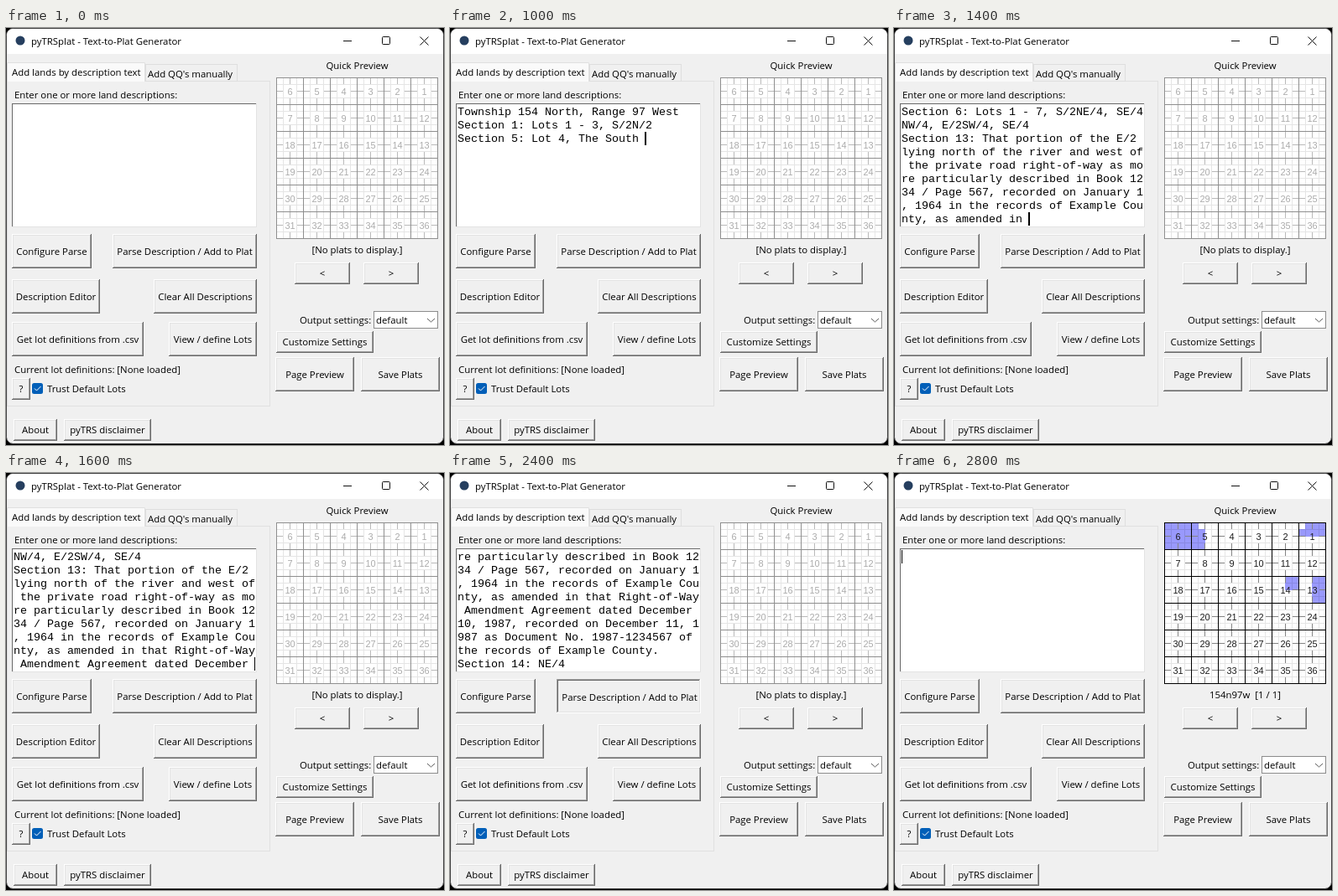
An HTML page for the animation above (4.6 s loop, 522 px wide and 498 px high).

```html
<!DOCTYPE html>
<html lang="en">
<head>
<meta charset="utf-8">
<title>Text-to-Plat Generator</title>
<style>
  html, body { margin: 0; width: 100%; height: 100%; overflow: hidden; background: #000; }
  svg { display: block; }
  text { font: 11.38px "Open Sans", "Noto Sans", sans-serif; white-space: pre; fill: #000; }
  .mid { text-anchor: middle; }
  .typed text { font: 13.333px "Liberation Mono", monospace; }
  .plat { --line: #8f8f8f; --half: #b9b9b9; --label: #ababab; }
  .plat.filled { --line: #000; --half: #848484; --label: #1c1c1c; }
  .plat path { fill: none; shape-rendering: crispEdges; }
  .plat .quarter { stroke: #000; stroke-opacity: .1; }
  .plat .half { stroke: var(--half); }
  .plat .section { stroke: var(--line); }
  .plat text { font: 11px "Liberation Sans", sans-serif; fill: var(--label); }
  .tracts { visibility: hidden; shape-rendering: crispEdges; }
  .filled .tracts { visibility: visible; }
</style>
</head>
<body>
<svg id="stage" width="522" height="498" viewBox="0 0 522 498"></svg>
<script>
const LOOP = 4600;
const COLUMNS = 36, ROWS = 9, CHAR = 8, LINE = 16;
const DESCRIPTION = `Township 154 North, Range 97 West
Section 1: Lots 1 - 3, S/2N/2
Section 5: Lot 4, The South Half of the Northwest Quarter, SW/4
Section 6: Lots 1 - 7, S/2NE/4, SE/4NW/4, E/2SW/4, SE/4
Section 13: That portion of the E/2 lying north of the river and west of the private road right-of-way as more particularly described in Book 1234 / Page 567, recorded on January 1, 1964 in the records of Example County, as amended in that Right-of-Way Amendment Agreement dated December 10, 1987, recorded on December 11, 1987 as Document No. 1987-1234567 of the records of Example County.
Section 14: NE/4`;

const upTo = phrase => DESCRIPTION.slice(0, DESCRIPTION.indexOf(phrase) + phrase.length);
const STEPS = [
  { at: 0, text: "" },
  { at: 1000, text: upTo("The South "), caret: true },
  { at: 1200, text: upTo("lying north of the river "), caret: true },
  { at: 1400, text: upTo("amended in "), caret: true },
  { at: 1600, text: upTo("dated December "), caret: true },
  { at: 1800, text: DESCRIPTION, caret: true },
  { at: 2400, text: DESCRIPTION, pressed: true },
  { at: 2800, text: "", caret: true, filled: true }
];

const rect = (x, y, w, h, fill, extra = "") =>
  `<rect x="${x}" y="${y}" width="${w}" height="${h}" fill="${fill}" ${extra}/>`;
const path = (d, attrs) => `<path d="${d}" ${attrs}/>`;
const label = (x, y, text, attrs = "") => `<text x="${x}" y="${y + 4}" ${attrs}>${text}</text>`;
const centered = (x, y, text, attrs = "") => label(x, y, text, `class="mid" ${attrs}`);

// One-pixel 3D edge around a face.
const edge = (x, y, w, h, topLeft, bottomRight, face) =>
  rect(x, y, w, h, bottomRight) + rect(x, y, w - 1, h - 1, topLeft)
  + rect(x + 1, y + 1, w - 2, h - 2, face);

function button(x, y, w, h, text, pressed = false) {
  const face = "#f0f0f0", shift = pressed ? 1 : 0;
  const outer = pressed ? ["#a0a0a0", "#fff"] : ["#fff", "#696969"];
  const inner = pressed ? ["#696969", "#e3e3e3"] : ["#e3e3e3", "#a0a0a0"];
  return edge(x, y, w, h, ...outer, face)
    + edge(x + 1, y + 1, w - 2, h - 2, ...inner, face)
    + centered(x + w / 2 + shift, Math.round(y + h / 2) + shift, text);
}

function titleBar() {
  return path("M1 31V9a8 8 0 0 1 8-8H513a8 8 0 0 1 8 8V31z", 'fill="#fff"')
    + '<circle cx="17" cy="15" r="5.5" fill="#263f5f"/>'
    + label(30, 16, "pyTRSplat - Text-to-Plat Generator")
    + rect(448.5, 10.5, 9, 9, "none", 'rx="1" stroke="#111"')
    + path("M402 15.5h10M493.5 10.5l10 10M503.5 10.5l-10 10", 'fill="none" stroke="#111"');
}

function notebook() {
  const parse = [127, 246, 172, 41, "Parse Description / Add to Plat"];
  return rect(1.5, 63.5, 313, 388, "#f0f0f0", 'stroke="#e0e0e0"')
    + rect(166.5, 43.5, 109, 20, "#f0f0f0", 'stroke="#dedede"')
    + path("M1.5 64V41.5H165.5V64", 'fill="#fafafa" stroke="#e0e0e0"')
    + label(7, 53, "Add lands by description text")
    + label(169, 55, "Add QQ's manually")
    + label(10, 80, "Enter one or more land descriptions:")
    + edge(7, 90, 292, 148, "#696969", "#e3e3e3", "#fff")
    + button(7, 246, 95, 41, "Configure Parse")
    + `<g id="parse">${button(...parse)}</g>`
    + `<g id="parsePressed">${button(...parse, true)}</g>`
    + button(7, 300, 105, 41, "Description Editor")
    + button(176, 300, 123, 41, "Clear All Descriptions")
    + button(7, 351, 157, 41, "Get lot definitions from .csv")
    + button(194, 351, 105, 41, "View / define Lots")
    + label(10, 408, "Current lot definitions: [None loaded]")
    + button(7, 418, 22, 26, "?")
    + rect(31, 424, 13, 13, "#005fb8", 'rx="2.5"')
    + path("M34 430.5l2.5 2.5 5-5", 'fill="none" stroke="#fff"')
    + label(49, 431, "Trust Default Lots");
}

function plat() {
  const left = 322, top = 59, cell = 32, size = cell * 6;
  const grid = (first, step) => {
    let d = "";
    for (let p = first; p <= size; p += step)
      d += `M${left + p + .5} ${top}v${size + 1}M${left} ${top + p + .5}h${size + 1}`;
    return d;
  };
  // Tracts as [column, row, x, y, width, height], the last four in quarter-quarters.
  const tracts = [
    [0, 0, 0, 0, 4, 4],
    [1, 0, 0, 0, 1, 1], [1, 0, 0, 1, 2, 3],
    [5, 0, 1, 0, 3, 1], [5, 0, 0, 1, 4, 1],
    [4, 2, 2, 0, 2, 2], [5, 2, 2, 0, 2, 4]
  ].map(([col, row, x, y, w, h]) =>
    rect(left + col * cell + x * 8, top + row * cell + y * 8, w * 8 + 1, h * 8 + 1, "#9999fc")).join("");

  let halves = "", numbers = "";
  for (let row = 0; row < 6; row++) {
    for (let col = 0; col < 6; col++) {
      const x = left + col * cell, y = top + row * cell;
      halves += `M${x} ${y + 16.5}h8m17 0h7M${x + 16.5} ${y}v8m0 17v7`;
      numbers += centered(x + 16.5, y + 17, row * 6 + (row % 2 ? col + 1 : 6 - col));
    }
  }
  return `<g id="plat" class="plat">${rect(left, top, size + 1, size + 1, "#fff")}`
    + `<g class="tracts">${tracts}</g>`
    + path(grid(8, 16), 'class="quarter"')
    + path(halves, 'class="half"')
    + path(grid(0, cell), 'class="section"') + numbers + "</g>";
}

function previewPane() {
  return centered(418.5, 45, "Quick Preview") + plat()
    + centered(418.5, 265, "", 'id="status"')
    + button(344, 280, 66, 26, "&lt;") + button(426, 280, 66, 26, "&gt;")
    + label(350, 349, "Output settings:")
    + rect(438.5, 338.5, 76, 20, "#fff", 'stroke="#8c8c8c"')
    + label(441, 349, "default")
    + path("M502 347l4.5 4 4.5-4", 'fill="none" stroke="#555"')
    + button(322, 362, 116, 26, "Customize Settings")
    + button(321, 393, 94, 41, "Page Preview")
    + button(423, 393, 94, 41, "Save Plats");
}

const byId = id => document.getElementById(id);
const show = (id, on) => { byId(id).style.display = on ? "" : "none"; };

byId("stage").innerHTML = rect(.5, .5, 521, 496, "#f0f0f0", 'rx="8" stroke="#444"')
  + titleBar() + notebook() + previewPane()
  + button(9, 467, 52, 26, "About") + button(69, 467, 104, 26, "pyTRS disclaimer")
  + '<svg class="typed" x="9" y="92" width="288" height="144"><g id="lines"></g>'
  + rect(0, 0, 2, LINE, "#000", 'id="caret"') + "</svg>";

function wrap(text) {
  return text.split("\n").flatMap(line => line.match(new RegExp(`.{1,${COLUMNS}}`, "g")) || [""]);
}

function render({ text, caret, pressed, filled }) {
  const lines = wrap(text).slice(-ROWS);
  byId("lines").innerHTML = lines.map((line, i) => `<text x="0" y="${12 + i * LINE}">${line}</text>`).join("");
  byId("caret").setAttribute("x", lines.at(-1).length * CHAR - 1);
  byId("caret").setAttribute("y", (lines.length - 1) * LINE);
  show("caret", caret);
  show("parse", !pressed);
  show("parsePressed", pressed);
  byId("plat").classList.toggle("filled", !!filled);
  byId("status").textContent = filled ? "154n97w  [1 / 1]" : "[No plats to display.]";
}

const start = performance.now();
let current;
function tick() {
  const time = (performance.now() - start) % LOOP;
  const step = STEPS.findLast(s => s.at <= time);
  if (step !== current) render(current = step);
  requestAnimationFrame(tick);
}
tick();
</script>
</body>
</html>
```
